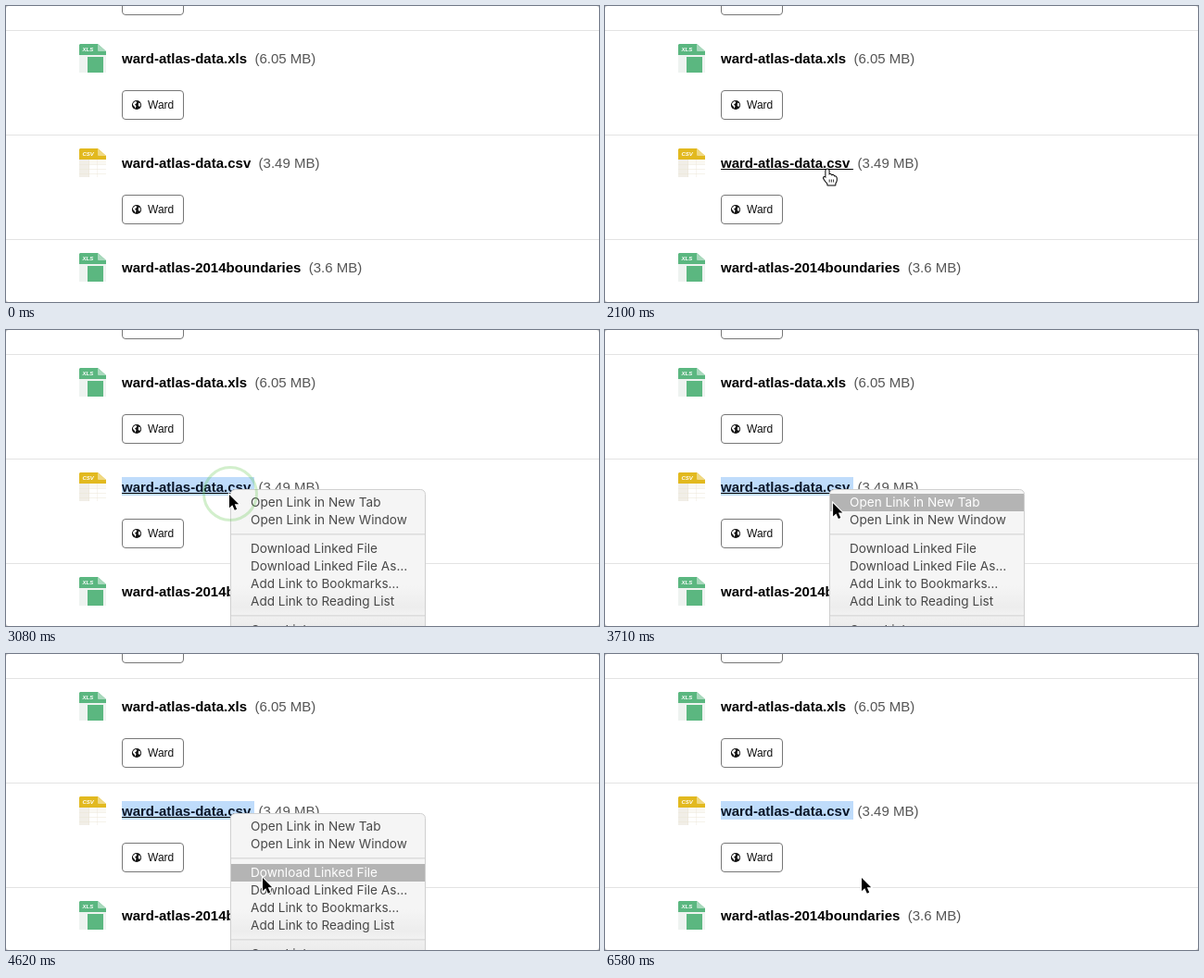
Recreate the animation shown at these times as an HTML page with a canvas. Size 640 px wide and 320 px high, loop 6720 ms.

```html
<!DOCTYPE html>
<html lang="en">
<head>
<meta charset="utf-8">
<title>Download a linked file</title>
<style>
  html, body { margin: 0; width: 100%; height: 100%; overflow: hidden; background: #fff; }
  canvas { display: block; }
</style>
</head>
<body>
<canvas id="stage" width="640" height="320"></canvas>
<script>
const ctx = document.getElementById('stage').getContext('2d');
const LOOP = 6720;
const SANS = '"Liberation Sans", Arial, sans-serif';
const MENU_FONT = '13.6px Inter, sans-serif';

// Moments at which the state of the page changes, in ms
const ENTER = 630, CLICK_LINK = 2660, MENU_OPEN = 3080, CLICK_ITEM = 4760;
const MENU_FADE = 5390, MENU_GONE = 5600, UNHOVER = 5670;

const files = [
  { y: 57, name: 'ward-atlas-data.xls', size: '(6.05 MB)', type: 'XLS' },
  { y: 170, name: 'ward-atlas-data.csv', size: '(3.49 MB)', type: 'CSV' },
  { y: 283, name: 'ward-atlas-2014boundaries', size: '(3.6 MB)', type: 'XLS' }
];

const menuItems = [
  [186, 'Open Link in New Tab'], [205, 'Open Link in New Window'],
  [236, 'Download Linked File'], [255, 'Download Linked File As…'],
  [274, 'Add Link to Bookmarks…'], [293, 'Add Link to Reading List'],
  [324, 'Copy Link']
];

// Pointer path: time, x, y
const pointerPath = [
  [630, 521, 293], [840, 492, 283], [1050, 492, 283], [1470, 281, 186],
  [1750, 257, 180], [2100, 240, 177], [2170, 240, 177], [2310, 241, 178],
  [3500, 241, 178], [3710, 246, 187], [4200, 273, 237], [4480, 277, 242]
];

const clamp = v => Math.max(0, Math.min(1, v));
const easeOut = v => 1 - (1 - v) ** 2;

function pointerAt(t) {
  const next = pointerPath.findIndex(p => p[0] > t);
  if (next < 0) return pointerPath.at(-1).slice(1);
  const [t0, x0, y0] = pointerPath[next - 1], [t1, x1, y1] = pointerPath[next];
  const k = easeOut((t - t0) / (t1 - t0));
  return [x0 + (x1 - x0) * k, y0 + (y1 - y0) * k];
}

function rect(x, y, w, h, color) {
  ctx.fillStyle = color;
  ctx.fillRect(x, y, w, h);
}

function text(str, x, y, font, color) {
  ctx.font = font;
  ctx.fillStyle = color;
  ctx.fillText(str, x, y);
}

function shape(d, fill, stroke, width = 1) {
  const path = new Path2D(d);
  if (stroke) {
    ctx.strokeStyle = stroke;
    ctx.lineWidth = width;
    ctx.stroke(path);
  }
  if (fill) {
    ctx.fillStyle = fill;
    ctx.fill(path);
  }
}

function at(x, y, draw) {
  ctx.save();
  ctx.translate(x, y);
  draw();
  ctx.restore();
}

function drawFileIcon(type) {
  const csv = type === 'CSV';
  const main = csv ? '#e2b91f' : '#5bb780';
  rect(0, 12, 29, 19, csv ? '#faf8f3' : '#eef3f0');
  shape('M1 0H20L29 8V12H0V1Z', main);
  shape('M20 0L29 8H21Q20 8 20 7Z', csv ? '#f0d983' : '#a9d9bd');
  text(type, 3.5, 8, 'italic bold 6px ' + SANS, '#fff');
  if (csv) {
    rect(0, 12, 11, 19, '#f1eee7');
    rect(11, 17, 18, 14, '#fff');
    for (let y = 17; y < 31; y += 5) rect(0, y, 29, 0.5, '#ebe4d5');
    rect(10.5, 12, 0.5, 19, '#ebe4d5');
    rect(19.5, 12, 0.5, 19, '#eee9dd');
  } else {
    rect(9, 14, 17, 17, main);
  }
}

function drawButton(y) {
  ctx.beginPath();
  ctx.roundRect(125.5, y + 0.5, 66, 31, 3.5);
  ctx.strokeStyle = '#777';
  ctx.lineWidth = 1;
  ctx.stroke();
  at(141, y + 16, () => {
    ctx.beginPath();
    ctx.arc(0, 0, 5.1, 0, 7);
    ctx.fillStyle = '#111';
    ctx.fill();
    shape('M-3.8 -2L-1.5 -4L.5 -3.2L-.8 -1.3L-2 -.5L-.5 1L-1.2 3.8L-2.5 1.5L-4 0Z', '#fff');
    shape('M2 -2.5L4 -1.5L4.2 .5L3 2.2L1.8 .3Z', '#fff');
  });
  text('Ward', 153, y + 20, '12px ' + SANS, '#111');
}

function drawPage(selected, underlined) {
  rect(0, 0, 640, 320, '#c4c4c4');
  ctx.beginPath();
  ctx.roundRect(0, 0, 640, 320, 3);
  ctx.fillStyle = '#fff';
  ctx.fill();
  for (const y of [26, 139, 252]) rect(0, y, 640, 1, '#e3e3e3');
  for (const y of [-22, 91, 204]) drawButton(y);
  if (selected) rect(125, 159, 143, 20, '#bfdcfb');
  for (const { y, name, size, type } of files) {
    const isLink = type === 'CSV';
    at(79, y - 16, () => drawFileIcon(type));
    text(name, 125, y + 5, 'bold 15px ' + SANS, isLink && selected ? '#081426' : '#000');
    const end = 125 + ctx.measureText(name).width;
    text(size, end + 8.34, y + 5, '15px ' + SANS, '#555');
    if (isLink && underlined) rect(125, y + 6, 143, 1, '#000');
  }
}

function drawMenu(alpha, highlight) {
  ctx.save();
  ctx.globalAlpha = alpha;
  ctx.beginPath();
  ctx.roundRect(242.5, 172.5, 210, 170, 5);
  const shade = ctx.createLinearGradient(0, 173, 0, 320);
  [[0, '#f5f5f5'], [0.7, '#f5f5f5'], [0.86, '#ededed'], [0.91, '#f1f1f1'], [1, '#ececec']]
    .forEach(stop => shade.addColorStop(...stop));
  ctx.fillStyle = shade;
  ctx.fill();
  ctx.strokeStyle = '#d0d0d0';
  ctx.lineWidth = 1;
  ctx.stroke();
  for (const y of [220, 308]) rect(243, y, 209, 1.5, '#dcdcdc');
  menuItems.forEach(([y, label], i) => {
    if (i === highlight) rect(243, y - 9, 209, 19, '#b4b4b4');
    text(label, 264, y + 5, MENU_FONT, i === highlight ? '#fff' : '#484848');
  });
  ctx.restore();
}

function drawRing(x, y, age) {
  if (age < 0 || age > 490) return;
  ctx.save();
  ctx.globalAlpha = 1 - clamp((age - 230) / 260);
  ctx.beginPath();
  ctx.arc(x + 1, y - 1, 6 + 22.5 * easeOut(clamp((age + 30) / 240)), 0, 7);
  ctx.strokeStyle = '#58c241';
  ctx.lineWidth = 3;
  ctx.stroke();
  ctx.restore();
}

function drawArrow() {
  shape('M0 0V14.2L3.3 11.2L5.8 16.8L8.2 15.7L5.8 10.3H10.2Z', '#000', '#fff', 2);
}

function drawHand() {
  ctx.lineJoin = 'round';
  shape('M-1.6 1Q-1.6 -.6 0 -.6T1.6 1V6Q1.8 4.8 3.2 5.1T4.5 6.6' +
    'Q5 5.6 6.2 6T7.3 7.5Q9.6 6.8 9.8 9V11.5Q9.5 13.5 8.4 14.5V16.5H.4V15' +
    'Q-1.8 12.8 -3.4 10.2Q-4.6 8.4 -3.2 8Q-2.5 7.8 -1.6 9.2Z', '#fff', '#000', 2);
  shape('M2.2 10.5V13.5M4.4 10.5V13.5M6.6 10.5V13.5', null, '#000', 0.8);
}

function highlightedItem(t, y) {
  if (t < 3570 || (t >= 5250 && t < 5320)) return -1;
  return menuItems.findIndex(item => y >= item[0] - 9.5 && y < item[0] + 9.5);
}

function render(t) {
  const [x, y] = t < ENTER ? [0, 0] : pointerAt(t);
  const menuOpen = t >= MENU_OPEN && t < MENU_GONE;
  const onLink = t >= ENTER && t < MENU_OPEN && x < 268 && y < 182;
  drawPage(t >= MENU_OPEN, onLink || (t >= MENU_OPEN && t < UNHOVER));
  if (menuOpen) {
    const fade = clamp((t - MENU_FADE + 35) / (MENU_GONE - MENU_FADE));
    drawMenu(1 - fade, highlightedItem(t, y));
  }
  if (t < ENTER) return;
  drawRing(x, y, t - CLICK_LINK);
  drawRing(x, y, t - CLICK_ITEM);
  at(x, y, onLink ? drawHand : drawArrow);
}

const start = performance.now();
function tick() {
  render((performance.now() - start) % LOOP);
  requestAnimationFrame(tick);
}
tick();
</script>
</body>
</html>
```
